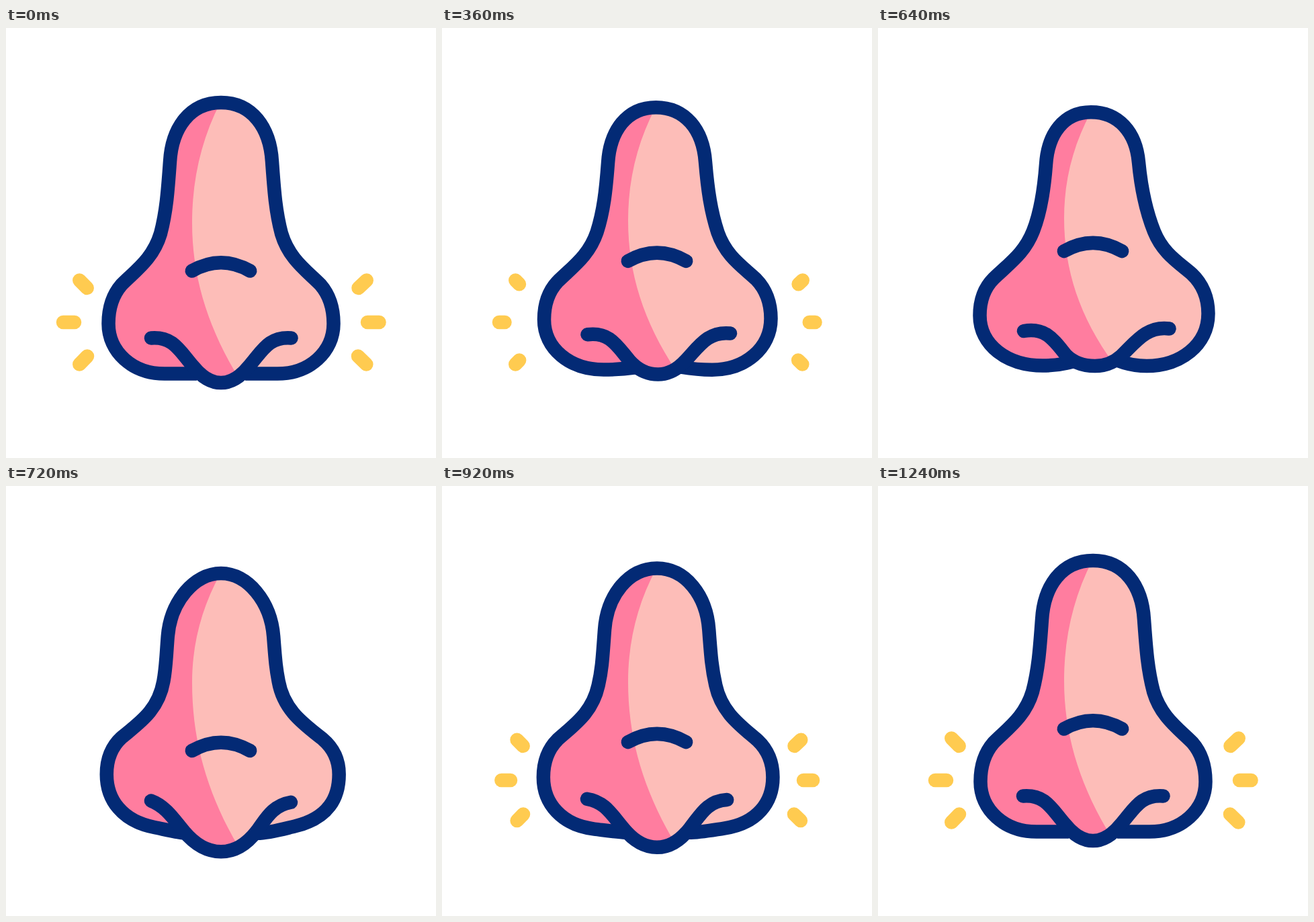
Animation of 640x640 px, one loop 1480 ms. Source, as an HTML page:

```html
<!DOCTYPE html>
<html lang="en">
<head>
<meta charset="utf-8">
<title>Breathing nose</title>
<style>
  html, body { margin: 0; width: 100%; height: 100%; overflow: hidden; background: #fff; }
  svg { display: block; width: 100vw; height: 100vh; }
  .line { fill: none; stroke: #032a75; stroke-width: 20.5; stroke-linecap: round; stroke-linejoin: round; }
  #outline { stroke-linecap: butt; }
  #rays path { stroke: #ffcb50; stroke-width: 20.5; stroke-linecap: round; }
</style>
</head>
<body>
<svg viewBox="0 0 640 640">
  <defs>
    <clipPath id="body">
      <path class="outline"/>
      <path class="tip"/>
    </clipPath>
  </defs>
  <g clip-path="url(#body)">
    <rect width="640" height="640" fill="#fdbdb8"/>
    <path class="shade" fill="#ff7d9f"/>
  </g>
  <path id="outline" class="line outline"/>
  <path class="line tip"/>
  <path class="line crease"/>
  <g id="rays"></g>
</svg>
<script>
const LOOP = 1480, STEP = 40;
const PEAK = 1.087; // how far the exhale reaches past the puffed pose

const rest = {
  outline: `M284,514.5 C268,514.5 252,514.5 236,514.5 C188,514.5 152.5,482 152.5,440
    C152.5,418 159,397 172,382 C194,360 219,343 230,306 C239,272 241,240 244,199
    C247,148 274,111 320,111 C366,111 393,148 396,199 C399,240 401,272 410,306
    C421,343 446,360 468,382 C481,397 487.5,418 487.5,440
    C487.5,482 452,514.5 404,514.5 C388,514.5 372,514.5 356,514.5`,
  tip: `M216,461.5 C249,459 258,480 278,503 C290,518 304,528 320,528
    C336,528 350,518 362,503 C382,480 391,459 424.5,461.5`,
  shade: `M319,111 C291,165 277,225 277,290 C277,370 300,445 347,522 L347,600 L100,600 L100,100 Z`,
  crease: `M276.8,361.5 Q320,337 363.2,361.5`
};

const inhale = {
  outline: `M292,496 C278,500 262,502.5 245,502.5 C192,502.5 151.5,472 151.5,428
    C151.5,406 158,387 172,373 C197,349 218,335 231,302 C242,274 247,243 250,203
    C253,158 276,125.3 317,125.3 C358,125.3 384,155 388,200 C392,242 399,273 411,303
    C424,335 446,348 467,366 C483,381 491.5,402 491.5,425
    C491.5,472 450,503 400,503 C384,503 370,500 357,495`,
  tip: `M217,451 C250,445 262,465 280,487 C293,500 308,503 323,503
    C338,503 350,499 362,488 C383,468 400,443 433.5,447.5`,
  shade: `M317,125 C290,175 277,228 277,283 C277,360 300,430 351,500 L351,600 L100,600 L100,100 Z`,
  crease: `M276.8,332.2 Q320,307.7 363.2,332.2`
};

const puff = {
  outline: `M268,516.5 C253,515 238,511.5 222,508.5 C174,500 150,468 150,430
    C150,408 157,389 172,375 C198,353 226,335 234,292 C238,272 238,262 241,222
    C245,170 280,128.5 320,128.5 C360,128.5 394,170 398,222 C401,262 402,272 406,292
    C414,335 444,355 471,377 C486,390 495,408 495,430
    C495,465 478,496 428,507 C410,511 390,516.5 373,516.5`,
  tip: `M216,468 C238,475 250,494 265,512 C282,533 300,543 320,543
    C340,543 357,533 373,512 C386,495 396,474 424,470`,
  shade: `M319,129 C291,180 277,235 277,292 C277,378 299,455 346,536 L346,600 L100,600 L100,100 Z`,
  crease: `M276.8,391.4 Q320,366.9 363.2,391.4`
};

// Each ray: outer x, outer y, inner x, inner y
const rays = [
  [109.3, 375.5, 120.7, 387], [85, 438, 102, 438], [109.3, 500.5, 121, 488.5],
  [536.7, 375.5, 524.5, 387], [555.5, 438, 538, 438], [536.3, 500.5, 524, 488.5]
];

const NUMBER = /-?[\d.]+/g;
const numbers = d => d.match(NUMBER).map(Number);
const mix = (a, b, k) => a + (b - a) * k;

// Smooth progress from 0 to 1 between two times
function ease(t, from, to) {
  const u = Math.min(1, Math.max(0, (t - from) / (to - from)));
  return u * u * (3 - 2 * u);
}

const parts = Object.keys(rest).map(name => ({
  template: rest[name],
  base: numbers(rest[name]),
  low: numbers(inhale[name]),
  high: numbers(puff[name]),
  nodes: document.querySelectorAll('.' + name)
}));

const rayNodes = rays.map(() => {
  const node = document.createElementNS('http://www.w3.org/2000/svg', 'path');
  document.getElementById('rays').append(node);
  return node;
});

function drawNose(lowWeight, highWeight) {
  for (const { template, base, low, high, nodes } of parts) {
    let i = 0;
    const d = template.replace(NUMBER, () => {
      const a = base[i];
      const v = a + (low[i] - a) * lowWeight + (high[i] - a) * highWeight;
      i++;
      return v.toFixed(2);
    });
    nodes.forEach(node => node.setAttribute('d', d));
  }
}

// Shows the span of every ray between two fractions, outer end first
function drawRays(start, end) {
  const visible = end - start > 0.001;
  rays.forEach(([x1, y1, x2, y2], i) => {
    const at = k => mix(x1, x2, k).toFixed(2) + ',' + mix(y1, y2, k).toFixed(2);
    rayNodes[i].setAttribute('d', visible ? `M${at(start)} L${at(end)}` : '');
  });
}

function render(t) {
  const breathIn = ease(t, 80, 640);
  const burst = ease(t, 640, 720);
  const settle = ease(t, 720, 1185);
  drawNose(breathIn * (1 - burst), PEAK * burst * (1 - settle));
  if (t < 640) drawRays(0, 1 - breathIn);
  else drawRays(1 - ease(t, 720, 1000), 1);
}

const began = performance.now();
function tick() {
  const t = (performance.now() - began) % LOOP;
  render(Math.floor(t / STEP) * STEP);
  requestAnimationFrame(tick);
}
render(0);
requestAnimationFrame(tick);
</script>
</body>
</html>
```
